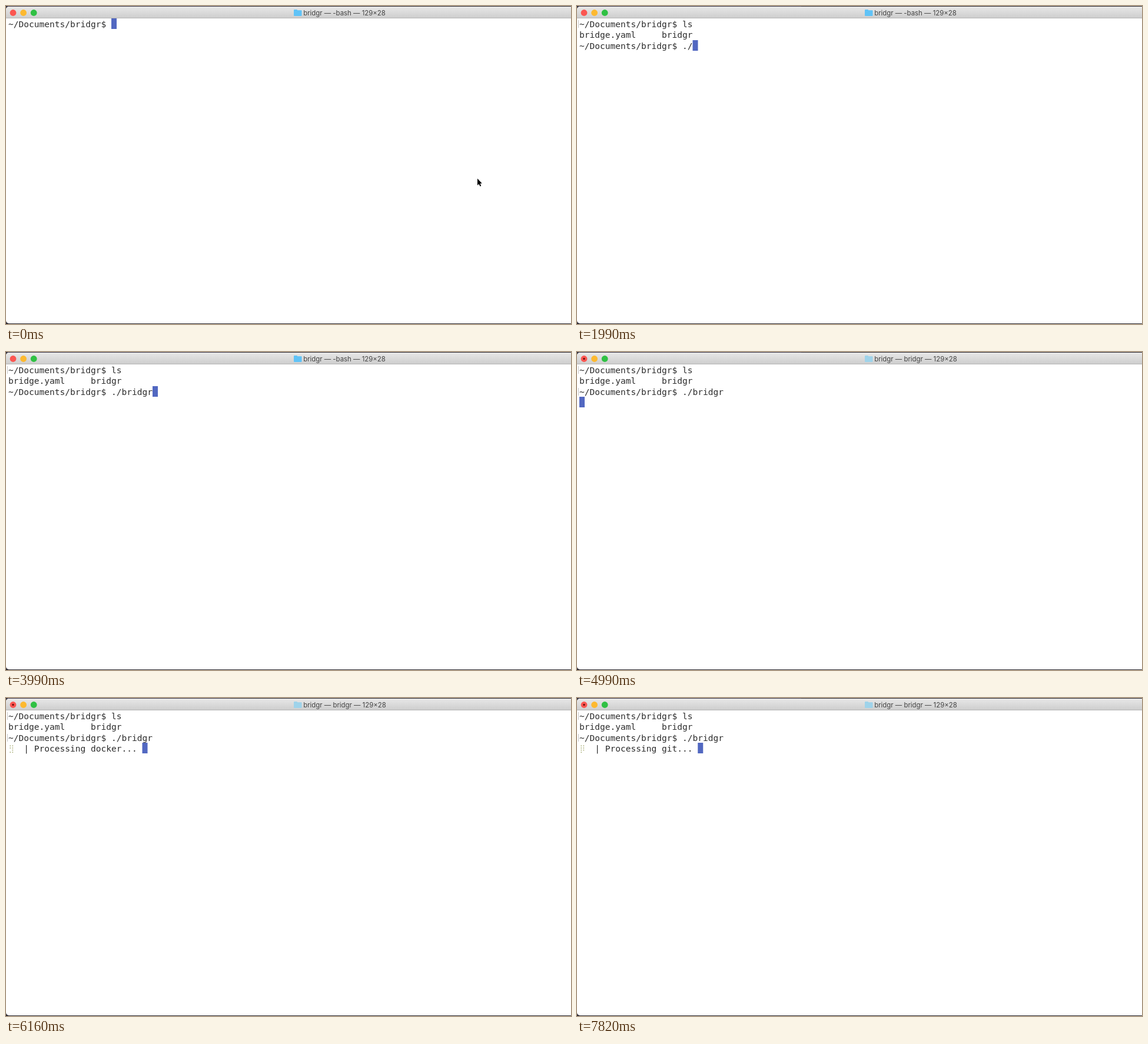
Write an HTML page with a canvas that moves like this. It is 960x540 px and loops after 7990 ms.

```html
<!DOCTYPE html>
<html lang="en">
<head>
<meta charset="utf-8">
<title>Terminal session</title>
<style>
  html, body { margin: 0; width: 100%; height: 100%; overflow: hidden; background: #fff; }
  canvas { display: block; }
</style>
</head>
<body>
<canvas id="stage" width="960" height="540"></canvas>
<script>
const ctx = document.getElementById('stage').getContext('2d');
const LOOP = 7990, CELL = 8.75, LEFT = 4, ROW = 18.4;
const PROMPT = '~/Documents/bridgr$ ';

const LIST_AT = 990, RUN_AT = 4320, DOCKER_AT = 5490, GIT_AT = 6990;
const LIST_KEYS = [490, 650];
const RUN_KEYS = [1650, 1990, 2320, 2490, 2650, 2820, 3150, 3320];

const typed = (text, keys, t) => text.slice(0, keys.filter(at => at <= t).length);

function rect(x, y, w, h, color) {
  ctx.fillStyle = color;
  ctx.fillRect(x, y, w, h);
}

function roundRect(x, y, w, h, radii, fill) {
  ctx.fillStyle = fill;
  ctx.beginPath();
  ctx.roundRect(x, y, w, h, radii);
  ctx.fill();
}

function disc(x, y, r, color) {
  ctx.fillStyle = color;
  ctx.beginPath();
  ctx.arc(x, y, r, 0, Math.PI * 2);
  ctx.fill();
}

function drawWindow(running) {
  rect(0, 0, 960, 540, '#2b2830');
  rect(0, 0, 381, 1, '#3b3547');
  roundRect(0, 1, 966, 538, 5, '#fff');

  const bar = ctx.createLinearGradient(0, 1, 0, 20);
  bar.addColorStop(0, '#e8e8e8');
  bar.addColorStop(1, '#cecece');
  roundRect(0, 1, 966, 19, [5, 5, 0, 0], bar);
  rect(0, 20, 960, 1, '#b4b4b4');

  ['#fb5651', '#fdb930', '#30c144'].forEach((color, i) => disc(12 + i * 17.6, 11.5, 5.4, color));
  if (running) disc(12, 11.5, 1.7, '#6b0f0d');

  const folder = running ? '#9fd3ea' : '#60c3f7';
  roundRect(489, 6, 6, 4, 1, folder);
  roundRect(489, 7.2, 13.5, 9.8, 1, folder);

  ctx.font = '11.4px Inter, sans-serif';
  ctx.textAlign = 'center';
  ctx.fillStyle = '#444';
  ctx.fillText(`bridgr — ${running ? 'bridgr' : '-bash'} — 129×28`, running ? 575.5 : 575, 16);
}

function drawLine(text, row) {
  ctx.font = '14.53px "DejaVu Sans Mono", monospace';
  ctx.textAlign = 'left';
  ctx.fillStyle = '#2c2c2c';
  const y = Math.round(36 + row * 18.3);
  [...text].forEach((char, col) => ctx.fillText(char, LEFT + col * CELL, y));
}

function drawCursor(col, row) {
  rect(LEFT + col * CELL, Math.round(21 + row * ROW), 9, 18, '#5268c1');
}

// A 2 × 4 dot grid whose single gap travels around the edge.
function drawSpinner(t) {
  const edge = [0, 1, 3, 5, 7, 6, 4, 2];
  const gap = edge[(Math.floor((t - 6160) / 118) + 14) % 8];
  for (let dot = 0; dot < 8; dot++) {
    if (dot !== gap) rect(6.5 + dot % 2 * 4, 80.5 + (dot >> 1) * 3.6, 1.6, 1.6, '#a5ab72');
  }
}

function drawPointer() {
  ctx.save();
  ctx.translate(801, 293);
  ctx.beginPath();
  [[0, 0], [0, 11.5], [2.6, 9.2], [4.5, 13.3], [6.3, 12.5], [4.5, 8.5], [7.8, 8.2]]
    .forEach(([x, y]) => ctx.lineTo(x, y));
  ctx.closePath();
  ctx.strokeStyle = '#fff';
  ctx.lineWidth = 1.5;
  ctx.stroke();
  ctx.fillStyle = '#000';
  ctx.fill();
  ctx.restore();
}

function draw(t) {
  const running = t >= RUN_AT;
  const lines = [PROMPT + typed('ls', LIST_KEYS, t)];
  if (t >= LIST_AT) lines.push('bridge.yaml     bridgr', PROMPT + typed('./bridgr', RUN_KEYS, t));
  if (running) {
    const task = t >= GIT_AT ? 'git' : t >= DOCKER_AT ? 'docker' : '';
    lines.push(task && `   | Processing ${task}... `);
  }

  drawWindow(running);
  lines.forEach(drawLine);
  drawCursor(lines.at(-1).length, lines.length - 1);
  if (t >= LIST_AT) rect(2, 24, 1, 13, '#c4c4c4');
  if (running) rect(2, 61, 1, 13, '#c4c4c4');
  if (t >= DOCKER_AT) drawSpinner(t);
  if (t < LIST_KEYS[0]) drawPointer();
}

const start = performance.now();
function tick() {
  draw((performance.now() - start) % LOOP);
  requestAnimationFrame(tick);
}
tick();
</script>
</body>
</html>
```
